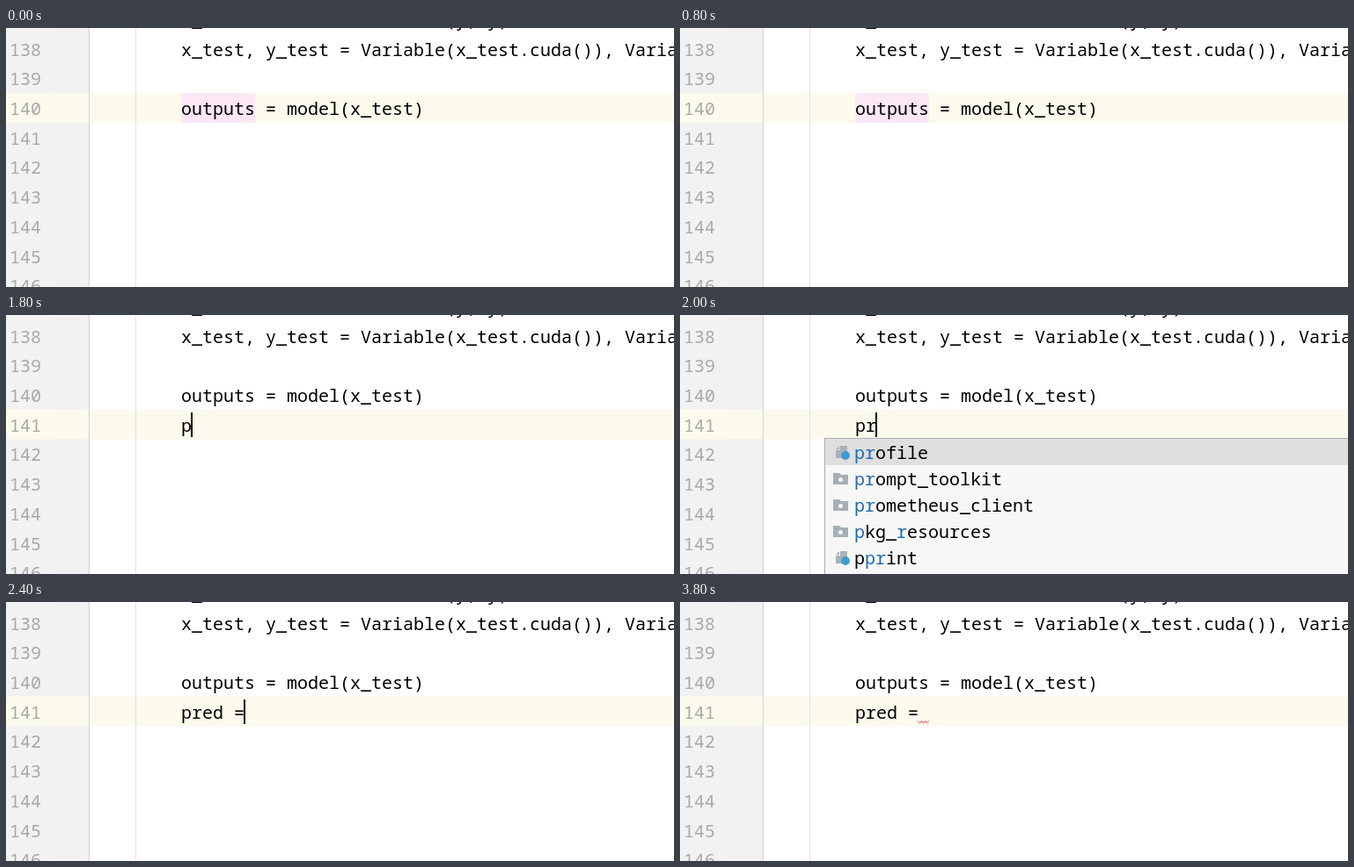
Animation of 759 by 295 pixels, one loop 4 s. Source, as an HTML page:

```html
<!DOCTYPE html>
<html lang="en">
<head>
<meta charset="utf-8">
<title>Code editor</title>
<style>
html, body { margin: 0; width: 100%; height: 100%; overflow: hidden; background: #fff; }
svg { display: block; width: 759px; height: 295px; }
text { font: 20px "Noto Sans Mono", "DejaVu Sans Mono", monospace; fill: #000; white-space: pre; }
#numbers text { fill: #a9a9a9; }
.hit { fill: #1f6cb5; }
.tip { font: 12.73px "Open Sans", "Noto Sans", sans-serif; fill: #808080; }
.tip .hit { fill: #2470b3; }
.badge { font: 600 11px "Open Sans", sans-serif; fill: #5b4a2d; text-anchor: middle; }
.panel { fill: #f7f7f7; stroke: #adadad; }
.selected { fill: #dfdfdf; }

/* One loop is 4 s, so 5% is 200 ms. Everything changes in hard steps. */
.timed, #row, #caret { animation: 4s step-end infinite; }
#row { animation-name: row; }
#caret { animation-name: caret; }
.bulb { animation-name: bulb; }
.usage { animation-name: usage; }
.key-p { animation-name: key-p; }
.key-r { animation-name: key-r; }
.key-ed { animation-name: key-ed; }
.key-eq { animation-name: key-eq; }
.modules { animation-name: modules; }
.variables { animation-name: variables; }
.error { animation-name: error; }

@keyframes row { 0% { transform: none; } 35%, 100% { transform: translateY(33.5px); } }
@keyframes bulb { 0%, 10%, 100% { visibility: hidden; } 5% { visibility: visible; } }
@keyframes usage { 0% { visibility: visible; } 35%, 100% { visibility: hidden; } }
@keyframes key-p { 0% { visibility: hidden; } 45%, 100% { visibility: visible; } }
@keyframes key-r { 0% { visibility: hidden; } 50%, 100% { visibility: visible; } }
@keyframes key-ed { 0% { visibility: hidden; } 55%, 100% { visibility: visible; } }
@keyframes key-eq { 0% { visibility: hidden; } 60%, 100% { visibility: visible; } }
@keyframes modules { 0%, 55%, 100% { visibility: hidden; } 50% { visibility: visible; } }
@keyframes variables { 0%, 60%, 100% { visibility: hidden; } 55% { visibility: visible; } }
@keyframes error { 0% { visibility: hidden; } 75%, 100% { visibility: visible; } }
@keyframes caret {
  0%, 20% { visibility: hidden; transform: translate(222px, 78px); height: 27px; }
  10% { visibility: visible; transform: translate(222px, 78px); height: 27px; }
  35% { visibility: visible; transform: translate(198px, 111px); height: 28px; }
  45% { visibility: visible; transform: translate(210px, 111px); height: 28px; }
  50% { visibility: visible; transform: translate(222px, 111px); height: 28px; }
  55% { visibility: visible; transform: translate(246px, 111px); height: 28px; }
  60% { visibility: visible; transform: translate(270px, 111px); height: 28px; }
  65% { visibility: visible; transform: translate(294px, 111px); height: 28px; }
  95%, 100% { visibility: hidden; transform: translate(294px, 111px); height: 28px; }
}
</style>
</head>
<body>
<svg viewBox="0 0 759 295">
  <defs>
    <g id="file">
      <path d="M182 149h8v14h-13v-9h5z" fill="#a9b2b9"/>
      <path d="M177 153l4-4v4z" fill="#a9b2b9"/>
      <circle cx="188" cy="160" r="5" fill="#3e9bd2"/>
    </g>
    <g id="folder">
      <path d="M174 150h7l2 2h8v11h-17z" fill="#a5afb6"/>
      <circle cx="182.5" cy="157.5" r="2.5" fill="#f4f5f6"/>
    </g>
    <g id="variable">
      <circle cx="183" cy="156.5" r="8.7" fill="#f4c77f"/>
      <text class="badge" x="183" y="160">v</text>
    </g>
  </defs>

  <rect width="759" height="295" fill="#fff"/>
  <rect width="94" height="295" fill="#f1f1f1"/>
  <rect width="56" height="295" fill="#f2f2f2"/>
  <rect id="row" y="74" width="759" height="34" fill="#fcfaed"/>
  <rect x="94" width="1" height="295" fill="#d4d4d4"/>
  <rect x="147" width="1" height="295" fill="#e4e4e4"/>
  <rect class="timed usage" x="199" y="74" width="84" height="34" fill="#fce8f4"/>
  <rect class="timed variables" x="199" y="108" width="48" height="33" fill="#edebfc"/>

  <g id="numbers"></g>

  <text x="199" y="-2">x_tests = data.batch.take(y, y)</text>
  <text x="199" y="32">x_test, y_test = Variable(x_test.cuda()), Variable(y_test.cuda())</text>
  <text x="199" y="99">outputs = model(x_test)</text>
  <text x="199" y="133"><tspan class="timed key-p">p</tspan><tspan class="timed key-r">r</tspan><tspan class="timed key-ed">ed</tspan><tspan class="timed key-eq"> =</tspan></text>
  <path class="timed error" d="M270.5 135.5l2 2.5 2-2.5 2 2.5 2-2.5 2 2.5 2-2.5" fill="none" stroke="#f03a3a"/>

  <g class="timed bulb">
    <path d="M118 91a6.7 6.7 0 1 1 6 0z" fill="#f4c648"/>
    <path d="M118 92h6v2h-6zM119 95h4v1h-4z" fill="#7f8b91"/>
  </g>

  <g class="timed modules">
    <rect class="panel" x="164.5" y="140.5" width="640" height="200"/>
    <rect class="selected" x="165" y="141" width="600" height="30"/>
    <use href="#file"/>
    <use href="#folder" y="30"/>
    <use href="#folder" y="60"/>
    <use href="#folder" y="90"/>
    <use href="#file" y="120"/>
    <text x="198" y="164"><tspan class="hit">pr</tspan>ofile</text>
    <text x="198" y="194"><tspan class="hit">pr</tspan>ompt_toolkit</text>
    <text x="198" y="224"><tspan class="hit">pr</tspan>ometheus_client</text>
    <text x="198" y="254"><tspan class="hit">p</tspan>kg_<tspan class="hit">r</tspan>esources</text>
    <text x="198" y="284">p<tspan class="hit">pr</tspan>int</text>
  </g>

  <g class="timed variables">
    <rect class="panel" x="164.5" y="140.5" width="640" height="91"/>
    <rect class="selected" x="165" y="141" width="600" height="30"/>
    <use href="#variable"/>
    <use href="#variable" y="30"/>
    <text class="hit" x="198" y="164">pred</text>
    <text x="198" y="194">y_<tspan class="hit">pred</tspan></text>
    <text class="tip" x="177" y="221">Press Ctrl+. to choose the selected (or first) suggestion and insert a dot afterwards</text>
    <text class="tip" x="670" y="221"><tspan class="hit">Next Tip</tspan></text>
    <g id="spinner" stroke="#b4b4b4" stroke-width="2.4"></g>
  </g>

  <rect id="caret" width="2" height="28"/>
</svg>
<script>
const add = (parent, tag, attrs, label = "") => {
  const node = document.createElementNS("http://www.w3.org/2000/svg", tag);
  for (const name in attrs) node.setAttribute(name, attrs[name]);
  node.textContent = label;
  document.getElementById(parent).append(node);
};

for (let line = 138; line <= 146; line++) {
  add("numbers", "text", { x: 4, y: Math.round(99 + (line - 140) * 33.7) }, line);
}
for (let angle = 0; angle < 360; angle += 45) {
  add("spinner", "path", { d: "M0-4.5V-9", transform: `translate(754 216) rotate(${angle})` });
}
</script>
</body>
</html>
```
